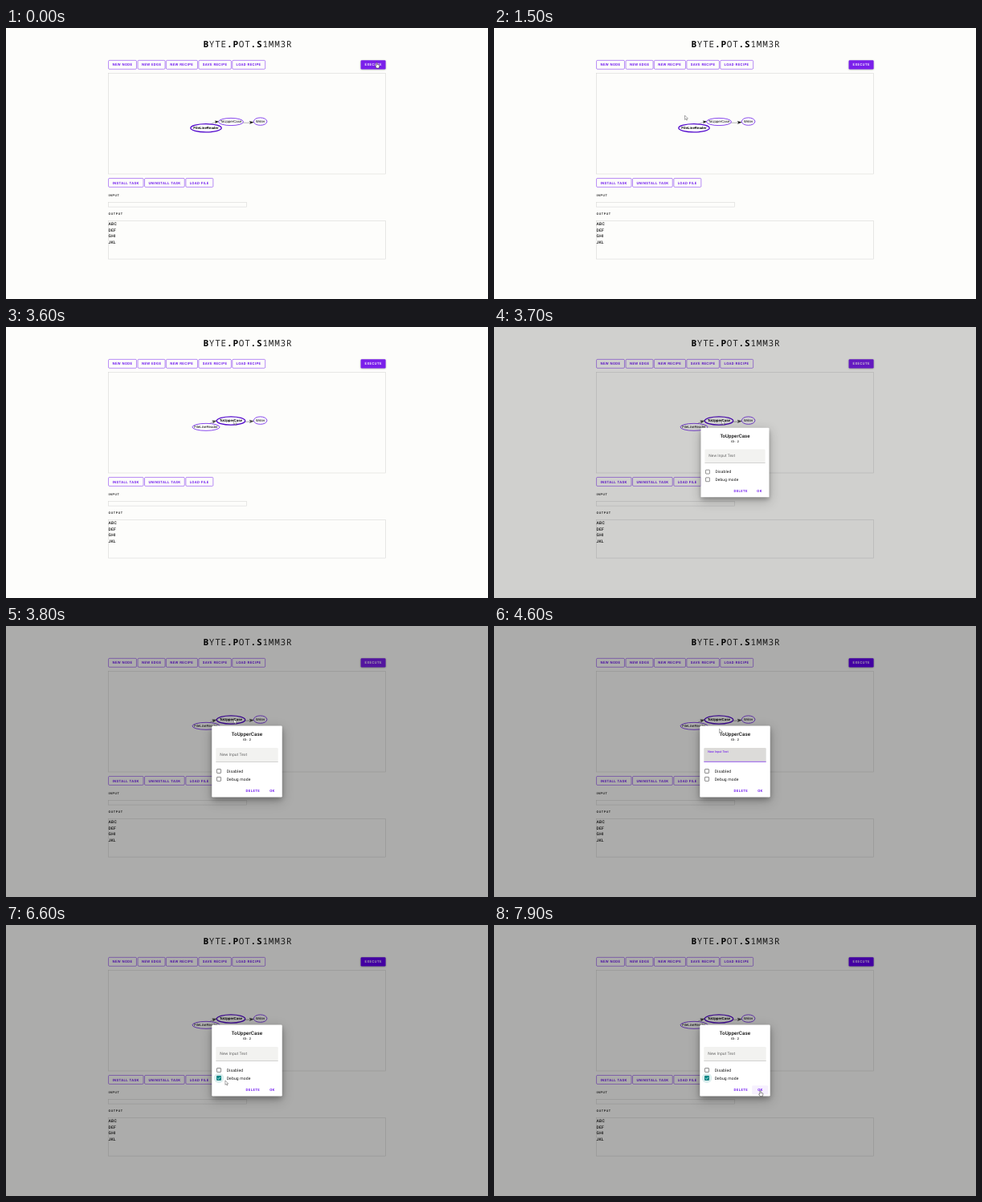
An HTML page for the animation above (8 s loop, 600x338 px).

```html
<!DOCTYPE html>
<html lang="en">
<head>
<meta charset="utf-8">
<title>Recipe editor</title>
<style>
  html, body { margin: 0; width: 100%; height: 100%; overflow: hidden; background: #fdfdfb; }
  svg { display: block; width: 100vw; height: 100vh; }
  text { font-family: Roboto, sans-serif; text-rendering: geometricPrecision; white-space: pre; }
  .btn { font-size: 4.375px; font-weight: 500; letter-spacing: .39px; fill: #6200ee; }
  .overline { font-size: 3.75px; font-weight: 500; letter-spacing: .625px; fill: #111; }
  .body { font-size: 5px; letter-spacing: .156px; fill: #111; }
  .label { font-size: 5px; letter-spacing: .045px; }
  .node { font-family: "Liberation Sans", Arial, sans-serif; font-size: 4.375px; fill: #000; }
  .title { font-family: "Noto Sans Mono", monospace; font-size: 11px; font-weight: 200; letter-spacing: .8px; fill: #222; }
  .title .heavy { font-weight: 800; fill: #000; }
  .mid { text-anchor: middle; }
  .frame { fill: none; stroke: #d2d2d0; stroke-width: .5; }
  #dialog { filter: drop-shadow(0 3px 3px rgba(0,0,0,.22)) drop-shadow(0 4px 7px rgba(0,0,0,.24)); }
</style>
</head>
<body>
<svg id="stage" viewBox="0 0 600 338" preserveAspectRatio="none"></svg>
<script>
const LOOP = 8000, STEP = 100;
const OPEN = 3700, FOCUS = 3900, CHECK = 5900, SELECT = 3200;
const stage = document.getElementById('stage');
const $ = id => document.getElementById(id);

const text = (x, y, cls, value, extra = '') =>
  `<text x="${x}" y="${y}" class="${cls}" ${extra}>${value}</text>`;
const rect = (x, y, w, h, extra = '') =>
  `<rect x="${x}" y="${y}" width="${w}" height="${h}" ${extra}/>`;
const button = (x, y, w, label) =>
  rect(x + .16, y + .16, w - .32, 10.94, 'rx="1.2" fill="none" stroke="#6200ee" stroke-width=".45"') +
  text(x + 5, y + 7.2, 'btn', label);
const node = (id, x, y, label) =>
  `<g id="${id}"><ellipse cx="${x}" cy="${y}" fill="#fff"/>` +
  text(x, y + 1.4, 'node mid', label) + '</g>';
const arrow = (x, y, angle, size) =>
  `<path d="M0 0L${-size} ${-size * .33}L${-size * .8} 0L${-size} ${size * .33}Z" transform="translate(${x} ${y}) rotate(${angle})"/>`;
const box = y => rect(262.5, y - 2.5, 5, 5, 'rx=".5" fill="none" stroke="#444" stroke-width=".6"');

const page = `
  <rect width="600" height="338" fill="#fdfdfb"/>
  <text x="300.9" y="24.2" class="title mid"><tspan class="heavy">B</tspan>YTE<tspan class="heavy">.P</tspan>OT<tspan class="heavy">.S</tspan>1MM3R</text>
  ${button(127.4, 40.2, 35.2, 'NEW NODE')}
  ${button(163.9, 40.2, 34.3, 'NEW EDGE')}
  ${button(199.2, 40.2, 39.4, 'NEW RECIPE')}
  ${button(239.7, 40.2, 40.8, 'SAVE RECIPE')}
  ${button(281.6, 40.2, 41.2, 'LOAD RECIPE')}
  ${rect(441.6, 40.8, 31, 11.2, 'rx="1.3" fill="#000" opacity=".3" style="filter:blur(.9px)"')}
  ${rect(441.6, 40.2, 31, 11.2, 'id="execute" rx="1.25"')}
  ${text(446.6, 47.4, 'btn', 'EXECUTE', 'style="fill:#fff"')}
  ${rect(127.5, 56.5, 345, 125.5, 'class="frame"')}
  <g id="edgesA" fill="#000" stroke="#555" stroke-width=".4">
    <path d="M254 120.2Q258 117.4 264.5 117M295 118.2Q300 118.6 308 117.6" fill="none"/>
    ${arrow(264.8, 116.6, -8, 4.5)}${arrow(308.3, 117.6, -4, 5)}
  </g>
  <g id="edgesB" fill="#444" stroke="#555" stroke-width=".5">
    <path d="M253.5 120.6Q257 118 262 117M297 118.2Q302 118.4 308 117.4" fill="none"/>
    ${arrow(262, 117, -16, 5)}${arrow(308.3, 117.4, -4, 5)}
  </g>
  ${node('reader', 249, 124.8, 'FileLineReader')}
  ${node('upper', 280, 117, 'ToUpperCase')}
  ${node('writer', 316.6, 116.6, 'Writer')}
  ${button(127.4, 187.3, 43.8, 'INSTALL TASK')}
  ${button(172.4, 187.3, 50, 'UNINSTALL TASK')}
  ${button(223.7, 187.3, 34.3, 'LOAD FILE')}
  ${text(127.5, 209.7, 'overline', 'INPUT')}
  ${rect(127.5, 217.4, 172, 5.7, 'class="frame"')}
  ${text(127.5, 233, 'overline', 'OUTPUT')}
  ${rect(127.5, 240.5, 345, 47.6, 'class="frame"')}
  ${['ABC', 'DEF', 'GHI', 'JKL'].map((s, i) => text(127.6, 246.4 + 7.5 * i, 'body', s, 'font-weight="500"')).join('')}
  <rect id="scrim" width="600" height="338"/>`;

const dialog = `
  <g id="dialog">
    ${rect(256.25, 124.4, 87.5, 89.2, 'rx="1.25" fill="#fff"')}
    ${text(300, 136.9, 'mid', 'ToUpperCase', 'font-size="6.25" font-weight="500" letter-spacing=".078" fill="#111"')}
    ${text(300.2, 143.4, 'overline mid', 'ID: 2')}
    <path id="field" d="M261.3 169.5V153.2Q261.3 152 262.5 152H337.5Q338.7 152 338.7 153.2V169.5Z"/>
    ${rect(261.3, 169.1, 77.4, .4, 'id="underline"')}
    <g id="label">${text(0, 0, 'label', 'New Input Text')}</g>
    <circle id="halo" cx="265" cy="190.9" r="6.25"/>
    ${box(181)}${box(190.9)}
    <g id="tick">${rect(262.2, 188.1, 5.6, 5.6, 'rx=".6" fill="#018786"')}
      <path d="M263.2 191l1.3 1.3 2.4-2.7" fill="none" stroke="#fff" stroke-width=".7"/></g>
    ${text(274.7, 182.7, 'body', 'Disabled')}
    ${text(274.7, 192.6, 'body', 'Debug mode')}
    ${rect(321.2, 200.2, 20, 11.25, 'id="okHover" rx="1.25" fill="#6200ee" opacity=".06"')}
    ${text(307.4, 207.4, 'btn mid', 'DELETE')}
    ${text(331.4, 207.4, 'btn mid', 'OK')}
  </g>`;

const pointer = `
  <g id="pointer" stroke-linejoin="round">
    <path id="arrow" d="M0 0V5.4L1.3 4.2L2.2 6.1L3 5.7L2.2 3.9H3.9Z" fill="#fff" stroke="#444" stroke-width=".45"/>
    <path id="hand" d="M-.6 .5Q0-.3 .6 .5V2.6L2.9 3.1Q3.6 3.3 3.4 4.2L2.9 7H-.3L-2 4.5Q-1.9 3.6-.6 4.4Z" fill="#fff" stroke="#222" stroke-width=".5"/>
  </g>`;

stage.innerHTML = page + dialog + pointer;

// Pointer stops: time, x, y
const stops = [
  [0, 461.5, 43], [400, 461.5, 43],
  [1300, 237.5, 109], [2200, 237.5, 109],
  [3000, 283.6, 116.4], [4400, 283.6, 116.4],
  [5200, 264.4, 192.2], [6400, 264.4, 192.2],
  [7300, 331.5, 206.6], [LOOP, 331.5, 206.6]
];
const clamp = v => Math.min(1, Math.max(0, v));
const smooth = v => v * v * (3 - 2 * v);
const easeOut = v => 1 - (1 - v) ** 3;

function pointerAt(t) {
  const i = stops.findIndex(s => s[0] > t);
  const [t0, x0, y0] = stops[i - 1], [t1, x1, y1] = stops[i];
  const k = smooth((t - t0) / (t1 - t0));
  return [x0 + (x1 - x0) * k, y0 + (y1 - y0) * k];
}

function set(id, attrs) {
  for (const name in attrs) $(id).setAttribute(name, attrs[name]);
}
const show = (id, on) => set(id, { visibility: on ? 'visible' : 'hidden' });

function styleNode(id, rx, ry, selected) {
  const ellipse = $(id).firstChild, label = $(id).lastChild;
  ellipse.setAttribute('rx', selected ? rx + 2.2 : rx);
  ellipse.setAttribute('ry', selected ? ry + .6 : ry);
  ellipse.setAttribute('stroke', selected ? '#5208cc' : '#6a1be8');
  ellipse.setAttribute('stroke-width', selected ? 1.3 : .8);
  label.setAttribute('font-weight', selected ? 700 : 400);
}

function render(t) {
  const [x, y] = pointerAt(t);
  const opened = t >= OPEN;
  const focused = t >= FOCUS && t < CHECK;
  const checked = t >= CHECK;
  const onExecute = x > 441 && y < 52;
  const onCheck = opened && x < 270 && y > 185;
  const onOk = opened && x > 321 && y > 200;
  const hand = onExecute || onCheck || onOk;

  const upperSelected = t >= SELECT;
  styleNode('reader', 17, 4.5, !upperSelected);
  styleNode('upper', 15.5, 4.6, upperSelected);
  styleNode('writer', 8.3, 4.7, false);
  show('edgesA', !upperSelected);
  show('edgesB', upperSelected);
  set('execute', { fill: t < FOCUS ? '#7a1fea' : '#6200ee' });

  const grow = clamp((t - OPEN + 84) / 150);
  set('scrim', { opacity: opened ? .32 * grow : 0 });
  show('dialog', opened);
  const scale = .8 + .2 * easeOut(clamp((t - OPEN + 72) / 150));
  set('dialog', { transform: `translate(300 169) scale(${scale}) translate(-300 -169)` });

  const float = focused ? easeOut(clamp((t - FOCUS + 50) / 150)) : 1 - clamp((t - CHECK + 50) / 150);
  const lift = t < FOCUS ? 0 : float;
  set('field', { fill: focused ? '#dcdbd9' : '#f2f2f0' });
  set('underline', { fill: focused ? '#6200ee' : '#8a8a8a', y: focused ? 168.9 : 169.15, height: focused ? .6 : .35 });
  set('label', {
    transform: `translate(266.3 ${162.2 - 3.9 * lift}) scale(${1 - .25 * lift})`,
    fill: focused ? '#6200ee' : '#666'
  });

  show('tick', opened && checked);
  set('halo', { fill: checked ? '#018786' : '#000', opacity: checked ? .14 : onCheck ? .04 : 0 });
  show('okHover', onOk);

  set('pointer', { transform: `translate(${x} ${y})` });
  show('hand', hand);
  show('arrow', !hand);
}

function tick(now) {
  render(Math.floor((now % LOOP) / STEP) * STEP);
  requestAnimationFrame(tick);
}
render(0);
requestAnimationFrame(tick);
</script>
</body>
</html>
```
